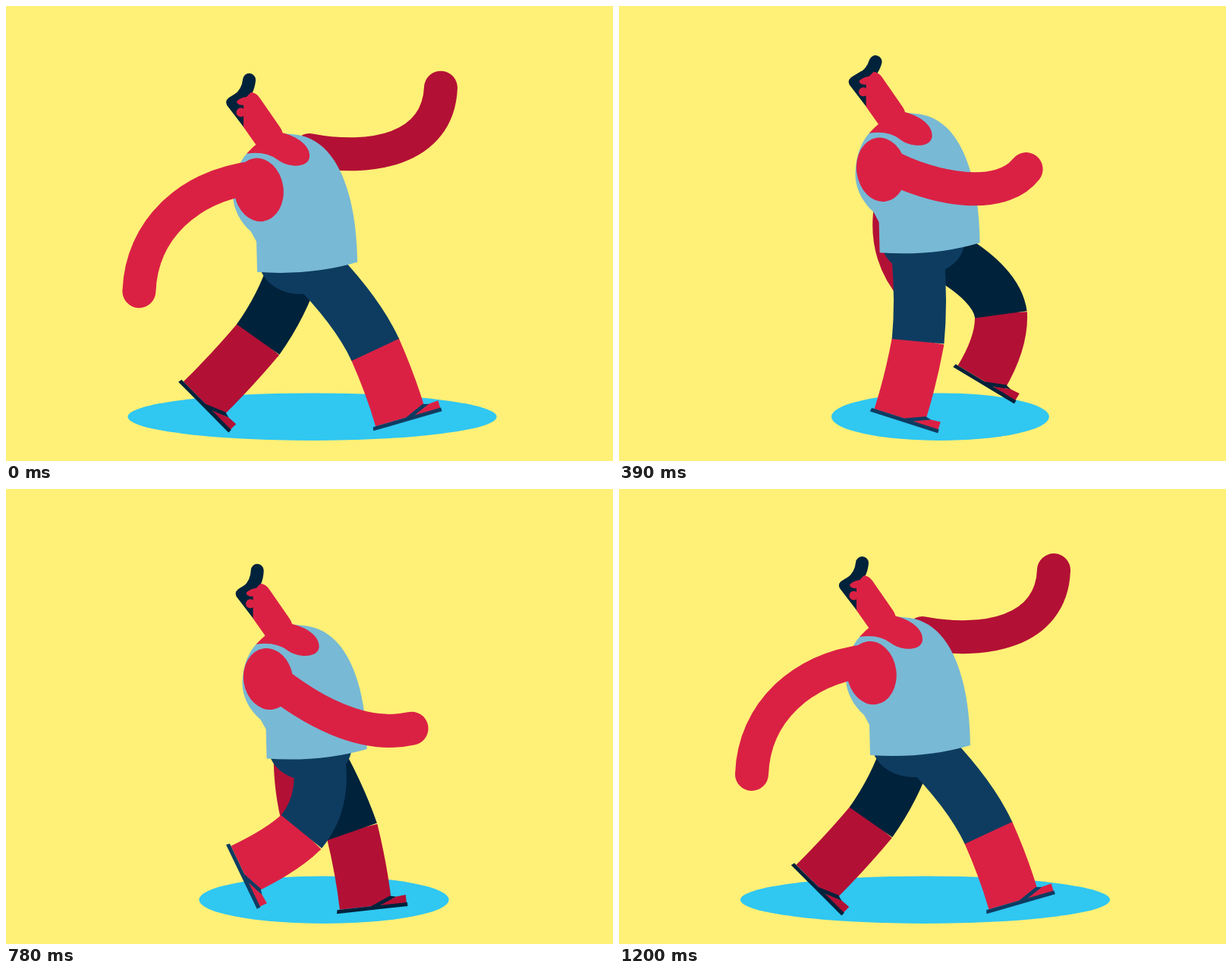
An HTML page without scripts that plays this animation: 800x600 px, repeating every 1.23 s.

```html
<!DOCTYPE html>
<html lang="en">
<head>
<meta charset="utf-8">
<title>Walk cycle</title>
<style>
  html, body { margin: 0; width: 100%; height: 100%; overflow: hidden; background: #fff077; }
  svg { display: block; width: 100vw; height: 100vh; }
  .near { --skin: #da2144; --cloth: #0e3c61; }
  .far { --skin: #b31035; --cloth: #00223b; }
  .skin { fill: var(--skin); }
  .cloth { fill: var(--cloth); }
  .shirt { fill: #78b9d5; }
  .hair { fill: #00223b; }
  .lock { fill: none; stroke: #00223b; stroke-width: 17; stroke-linecap: round; }
  .arm, .thigh, .shin { fill: none; stroke: var(--skin); stroke-width: 44; stroke-linecap: round; }
  .thigh, .shin { stroke-width: 69; stroke-linecap: butt; }
  .thigh { stroke: var(--cloth); }
  .near .shin { marker-start: url(#kneeNear); marker-end: url(#footNear); }
  .far .shin { marker-start: url(#kneeFar); marker-end: url(#footFar); }
</style>
</head>
<body>
<svg viewBox="0 0 800 600">
  <defs>
    <path id="knee" d="M-2-34.5h3v69h-3z"/>
    <path id="toes" d="M20 1L40-9L54-10V1z"/>
    <path id="sandal" d="M-38 0H7L33-11L41-9L19 0H55V5H-39z"/>
    <marker id="kneeNear" class="near" orient="auto" markerUnits="userSpaceOnUse" overflow="visible">
      <use href="#knee" class="skin"/>
    </marker>
    <marker id="kneeFar" class="far" orient="auto" markerUnits="userSpaceOnUse" overflow="visible">
      <use href="#knee" class="skin"/>
    </marker>
    <marker id="footNear" class="near" orient="auto" markerUnits="userSpaceOnUse" overflow="visible">
      <g transform="rotate(-90)"><use href="#toes" class="skin"/><use href="#sandal" class="cloth"/></g>
    </marker>
    <marker id="footFar" class="far" orient="auto" markerUnits="userSpaceOnUse" overflow="visible">
      <g transform="rotate(-90)"><use href="#toes" class="skin"/><use href="#sandal" class="cloth"/></g>
    </marker>
  </defs>

  <rect width="800" height="600" fill="#fff077"/>

  <ellipse cx="403.5" cy="541.7" rx="243.5" ry="31.2" fill="#30c7f1">
    <animate attributeName="cx" dur="1.23s" repeatCount="indefinite"
      keyTimes="0;.0488;.2439;.3659;.4146;.4878;.5366;.7317;.8537;.9024;.9756;1"
      values="403.5;408.5;429.5;419.5;411;403.5;408.5;429.5;419.5;411;403.5;403.5"/>
    <animate attributeName="rx" dur="1.23s" repeatCount="indefinite"
      keyTimes="0;.0488;.2439;.3659;.4146;.4878;.5366;.7317;.8537;.9024;.9756;1"
      values="243.5;217.5;112.5;163.5;204;243.5;217.5;112.5;163.5;204;243.5;243.5"/>
  </ellipse>

  <g class="far">
    <path class="arm">
      <animate attributeName="d" dur="1.23s" repeatCount="indefinite"
        keyTimes="0;.0488;.1463;.2439;.3659;.4146;.4878;.5366;.6341;.7317;.8537;.9024;.9756;1"
        values="M400 190C480 205 570 190 573 107;
          M400 195C465 220 545 215 573 152;
          M405 220C470 250 540 270 560 290;
          M400 240C405 300 440 355 517 372;
          M390 155C320 195 270 290 305 375;
          M385 165C290 200 228 305 270 380;
          M385 190C310 225 235 310 266 386;
          M375 195C325 260 275 320 279 385;
          M385 225C375 300 365 370 385 440;
          M405 222C500 255 522 310 502 391;
          M405 137C480 180 575 190 591 118;
          M402 155C478 190 570 195 582 112;
          M400 190C480 205 570 190 573 107;
          M400 190C480 205 570 190 573 107"/>
    </path>
    <path class="shin">
      <animate attributeName="d" dur="1.23s" repeatCount="indefinite"
        keyTimes="0;.0488;.2439;.3659;.4146;.4878;.5366;.7317;.8537;.9024;.9756;1"
        values="M332 439.5Q300 478 258 520;
          M345 456Q317 483 267 509;
          M461 442Q453 465 392 504;
          M531 384Q539 430 531 484;
          M497 381Q522 418 543.5 477.5;
          M495 453Q516 501 529 545;
          M479 441.5Q500 499 511 547;
          M434 462Q438.5 510 438 555;
          M383 428Q363 484 338 533;
          M352 444Q326 485 290 520;
          M332 439.5Q300 478 258 520;
          M332 439.5Q300 478 258 520"/>
    </path>
    <path class="thigh">
      <animate attributeName="d" dur="1.23s" repeatCount="indefinite"
        keyTimes="0;.0488;.2439;.3659;.4146;.4878;.5366;.7317;.8537;.9024;.9756;1"
        values="M380 345Q364 394 332 439.5;
          M388 330Q386 414 345 456;
          M430 365Q468 395 461 442;
          M418 297Q517 345 531 384;
          M420 332Q470 354 497 381;
          M408 338Q470 400 495 453;
          M410 335Q456 392 479 441.5;
          M398 345Q420 405 434 462;
          M400 320Q396 378 383 428;
          M396 320Q388 393 352 444;
          M380 345Q364 394 332 439.5;
          M380 345Q364 394 332 439.5"/>
    </path>
  </g>

  <g class="near">
    <path class="shin">
      <animate attributeName="d" dur="1.23s" repeatCount="indefinite"
        keyTimes="0;.0488;.2439;.3659;.4146;.4878;.5366;.7317;.8537;.9024;.9756;1"
        values="M487 453.5Q508 501 520.6 544.7;
          M471 441Q492 499 503 547;
          M423.5 464Q430 510 430 555;
          M375 428Q355 484 330 533;
          M344.5 444.5Q318 485 282 520;
          M324 440Q292 480 250 520;
          M337.5 456Q309 483 259 509;
          M440.5 448Q421 469 363 495;
          M523 384.5Q531 430 523.5 484;
          M489 381Q514 415 535 477;
          M487 453.5Q508 501 520.6 544.7;
          M487 453.5Q508 501 520.6 544.7"/>
    </path>
    <path class="thigh">
      <animate attributeName="d" dur="1.23s" repeatCount="indefinite"
        keyTimes="0;.0488;.2439;.3659;.4146;.4878;.5366;.7317;.8537;.9024;.9756;1"
        values="M400 338Q462 400 487 453.5;
          M402 335Q448 392 471 441;
          M394 345Q416 410 423.5 464;
          M394 320Q388 378 375 428;
          M388 320Q380 393 344.5 444.5;
          M378 345Q357 394 324 440;
          M386 330Q380 414 337.5 456;
          M432 350Q470 402 440.5 448;
          M410 297Q509 345 523 384.5;
          M412 332Q464 354 489 381;
          M400 338Q462 400 487 453.5;
          M400 338Q462 400 487 453.5"/>
    </path>

    <!-- Body bob; the torso squashes from the hem while the head rides on top -->
    <g>
      <animateTransform attributeName="transform" type="translate" dur="1.23s" repeatCount="indefinite" calcMode="spline"
        keyTimes="0;.0488;.2439;.3659;.4146;.4878;.5366;.7317;.8537;.9024;.9756;1"
        keySplines=".3 .3 .5 1;.4 0 .6 1;.4 0 .6 1;.5 0 .7 .7;.3 .3 .7 .7;.3 .3 .5 1;.4 0 .6 1;.4 0 .6 1;.5 0 .7 .7;.3 .3 .7 .7;0 0 1 1"
        values="0 0;5 -10;20 22;9 -49;8 -30;0 0;5 -10;20 19;9 -49;8 -30;0 0;0 0"/>
      <ellipse class="cloth" cx="388" cy="335" rx="55" ry="45"/>
      <g transform="translate(0 345)">
        <g>
          <animateTransform attributeName="transform" type="scale" dur="1.23s" repeatCount="indefinite" calcMode="spline"
            keyTimes="0;.0488;.2439;.3659;.4146;.4878;.5366;.7317;.8537;.9024;.9756;1"
            keySplines=".3 .3 .5 1;.4 0 .6 1;.4 0 .6 1;.5 0 .7 .7;.3 .3 .7 .7;.3 .3 .5 1;.4 0 .6 1;.4 0 .6 1;.5 0 .7 .7;.3 .3 .7 .7;0 0 1 1"
            values="1 1;1 1;1 .925;1 1.05;1 1.033;1 1;1 1;1 .935;1 1.05;1 1.033;1 1;1 1"/>
          <g transform="translate(0 -345)">
            <path class="shirt" d="M331 351L330 311L323 298C305 282 298 262 299 245C300 224 306 208 317 195L364 168L383 170C440 178 462 255 463 338Q402 356 331 351z"/>
            <path class="skin" d="M317 195Q324 187 334 179L362 167C385 172 401 185 400 199C399 214 372 214 358 203Q342 191 317 195z"/>
            <ellipse class="skin" cx="333" cy="242.5" rx="32.5" ry="42" transform="rotate(-8 333 242.5)"/>
          </g>
        </g>
      </g>
      <g>
        <animateTransform attributeName="transform" type="translate" dur="1.23s" repeatCount="indefinite" calcMode="spline"
          keyTimes="0;.0488;.2439;.3659;.4146;.4878;.5366;.7317;.8537;.9024;.9756;1"
          keySplines=".3 .3 .5 1;.4 0 .6 1;.4 0 .6 1;.5 0 .7 .7;.3 .3 .7 .7;.3 .3 .5 1;.4 0 .6 1;.4 0 .6 1;.5 0 .7 .7;.3 .3 .7 .7;0 0 1 1"
          values="0 0;0 0;0 14;0 -9;0 -6;0 0;0 0;0 12;0 -9;0 -6;0 0;0 0"/>
        <path class="lock" d="M306 124Q319 114 320.5 97.5">
          <animateTransform attributeName="transform" type="rotate" dur="1.23s" repeatCount="indefinite"
            keyTimes="0;.0488;.2439;.3659;.4146;.4878;.5366;.7317;.8537;.9024;.9756;1"
            values="0 306 124;0 306 124;-8 306 124;24 306 124;8 306 124;0 306 124;0 306 124;-8 306 124;24 306 124;8 306 124;0 306 124;0 306 124"/>
        </path>
        <path class="hair" d="M314 161L291 131Q287 124 297 119L307 113L320 117L316 140z"/>
        <path class="skin" d="M332 187L313 160V131Q304 131 304 126Q309 121 317 120L323 114Q330 115 334 121L361 160Q366 167 364 173L350 190z"/>
        <circle class="skin" cx="309.5" cy="140.5" r="6"/>
      </g>
    </g>

    <path class="arm">
      <animate attributeName="d" dur="1.23s" repeatCount="indefinite"
        keyTimes="0;.0488;.1463;.2439;.3659;.4146;.4878;.5366;.6341;.7317;.8537;.9024;.9756;1"
        values="M330 226C240 236 178 295 175 376;
          M335 218C262 245 205 310 200 385;
          M346 250C335 310 325 370 350 440;
          M352 258C400 298 460 352 519 374;
          M350 176C425 208 532 196 548 112;
          M355 197C440 200 515 160 529 92;
          M345 222C440 230 520 195 534 122;
          M350 224C420 242 490 229 539 180;
          M350 250C400 290 470 330 535 315;
          M350 278C365 345 410 396 482 397;
          M330 174C255 200 206 270 204 346;
          M330 196C250 212 192 280 190 364;
          M330 226C240 236 178 295 175 376;
          M330 226C240 236 178 295 175 376"/>
    </path>
  </g>
</svg>
</body>
</html>
```
